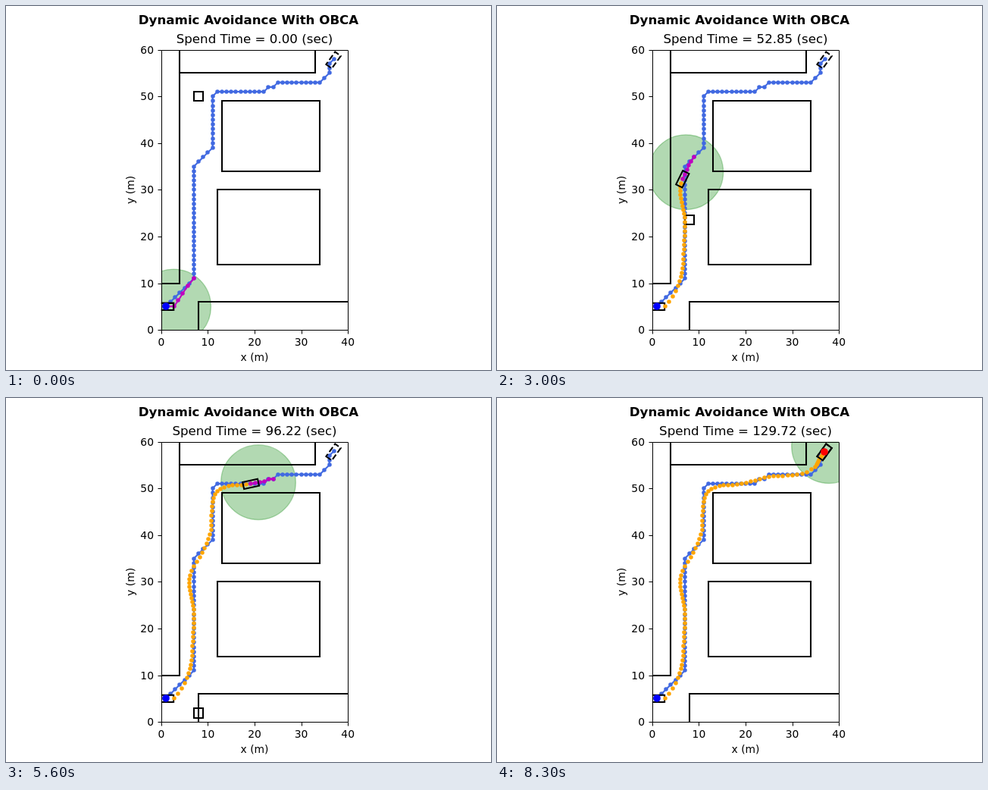
Animation, 640 px wide and 480 px high, one loop 8400 ms. Source, as an HTML page:

```html
<!DOCTYPE html>
<html lang="en">
<head>
<meta charset="utf-8">
<title>Dynamic Avoidance With OBCA</title>
<style>
  html, body { margin: 0; width: 100%; height: 100%; overflow: hidden; background: #fff; }
  svg { display: block; width: 640px; height: 480px; font: 13.89px "DejaVu Sans", sans-serif; }
  .title { font-size: 16.67px; }
  .bold { font-weight: bold; }
  .wall { fill: none; stroke: #000; stroke-width: 2.08; }
  .axis { fill: none; stroke: #000; stroke-width: 1; }
  .route { fill: none; stroke-width: 2.08; stroke-linejoin: round; }
  #range { fill: green; stroke: green; stroke-width: 1.39; fill-opacity: .3; stroke-opacity: .3; }
</style>
</head>
<body>
<svg viewBox="0 0 640 480">
  <defs><clipPath id="area"><rect x="204.8" y="57.6" width="246.4" height="369.6"/></clipPath></defs>
  <g text-anchor="middle">
    <text class="title bold" x="320" y="24">Dynamic Avoidance With OBCA</text>
    <text class="title" id="clock" x="328" y="49"></text>
    <text x="328" y="468">x (m)</text>
    <text transform="translate(169 242.4) rotate(-90)">y (m)</text>
  </g>
  <g clip-path="url(#area)">
    <circle id="range" r="49.28"/>
    <g id="map"></g>
    <path id="mover" class="wall"/>
    <g id="trail"></g>
    <g id="plan"></g>
    <path id="car" class="wall"/>
    <g id="ends"></g>
  </g>
  <g id="axes"></g>
</svg>
<script>
const STEP = 100, COUNT = 84, LAST = COUNT - 1, HORIZON = 5;
const CAR = { half: 1.65, side: 0.75 };
const px = x => 204.8 + 6.16 * x;
const py = y => 427.2 - 6.16 * y;
const $ = id => document.getElementById(id);
const mix = (a, b, k) => a + (b - a) * k;

// Everything is placed in metres; markers and walls sit on whole pixels
const line = points => "M" + points.map(([x, y]) => `${px(x)} ${py(y)}`).join("L");
const wall = points => "M" + points.map(([x, y]) => `${Math.round(px(x))} ${Math.round(py(y))}`).join("L");
const box = (x0, y0, x1, y1) => wall([[x0, y0], [x1, y0], [x1, y1], [x0, y1]]) + "Z";
const dot = ([x, y], color, r = 2.78) =>
  `<circle cx="${Math.round(px(x))}" cy="${Math.round(py(y))}" r="${r}" fill="${color}"/>`;
const dots = (points, color) => points.map(p => dot(p, color)).join("");

// Point at (forward, left) metres from a vehicle centre
const offset = ([x, y], angle, f, l) =>
  [x + f * Math.cos(angle) - l * Math.sin(angle), y + f * Math.sin(angle) + l * Math.cos(angle)];
function vehicle(pose, angle) {
  const { half, side } = CAR;
  const corners = [[-half, side], [-half, -side], [half, -side], [half, side]];
  return line(corners.map(([f, l]) => offset(pose, angle, f, l))) + "Z";
}

// Grid route: unit steps between its bends
const bends = [[1, 5], [7, 11], [7, 35], [11, 39], [11, 50], [12, 51], [22, 51], [23, 52],
  [24, 52], [25, 53], [34, 53], [36, 55], [36, 57], [37, 58]];
const route = [bends[0]];
for (const [bx, by] of bends.slice(1)) {
  let [x, y] = route[route.length - 1];
  while (x !== bx || y !== by) {
    x += Math.sign(bx - x);
    y += Math.sign(by - y);
    route.push([x, y]);
  }
}

// Driven path: a smooth curve through a few points (step, x, y)
const keys = [[0, 1, 5], [1, 2.75, 5], [5, 5.55, 9.45], [9, 6.55, 13.2], [12, 6.75, 16.2], [20, 7, 24],
  [26, 6.05, 28.95], [30, 6.5, 32.3], [34, 8.85, 36.3], [38, 10.5, 40.1], [40, 10.75, 42.1],
  [45, 11, 47.1], [48, 12, 49.35], [51, 14.4, 50.5], [56, 19.2, 50.95], [62, 25, 52.45],
  [69, 32.1, 53.05], [72, 34.95, 54.6], [76, 35.7, 56.05], [LAST, 36.9, 57.75]];
const segment = (table, t) => Math.max(1, table.findIndex(row => row[0] >= t));

function slope(n, axis) {
  const a = keys[Math.max(n - 1, 0)], b = keys[Math.min(n + 1, keys.length - 1)];
  return (b[axis] - a[axis]) / (b[0] - a[0]);
}
function poseAt(t) {
  const n = segment(keys, t), a = keys[n - 1], b = keys[n];
  const span = b[0] - a[0], k = (t - a[0]) / span;
  return [1, 2].map(axis =>
    mix(a[axis], b[axis], k * k * (3 - 2 * k)) +
    span * k * (1 - k) * (slope(n - 1, axis) * (1 - k) - slope(n, axis) * k));
}
const poses = Array.from({ length: COUNT }, (_, i) => poseAt(i));

function heading(i) {
  const n = Math.min(i, LAST - 1);
  return Math.atan2(poses[n + 1][1] - poses[n][1], poses[n + 1][0] - poses[n][0]);
}

// Elapsed seconds grow with the distance driven between known readings
const driven = [0];
for (let i = 1; i < COUNT; i++)
  driven[i] = driven[i - 1] + Math.hypot(poses[i][0] - poses[i - 1][0], poses[i][1] - poses[i - 1][1]);
const readings = [[0, 0], [12, 23.03], [30, 52.85], [40, 70.95], [56, 96.22], [69, 118.24], [LAST, 129.72]];
function seconds(i) {
  const n = segment(readings, i), [a, ta] = readings[n - 1], [b, tb] = readings[n];
  return mix(ta, tb, (driven[i] - driven[a]) / (driven[b] - driven[a]));
}

// Short look-ahead that bends from the driven path to the grid route
function lookAhead(i) {
  const target = Math.min(Math.round(Math.max(i + 2, 6 + 0.87 * i)), route.length - 1);
  return Array.from({ length: HORIZON + 1 }, (_, k) => {
    const own = poses[Math.min(i + k, LAST)], ref = route[target - HORIZON + k];
    const w = (k / HORIZON) ** 2;
    return [mix(own[0], ref[0], w), mix(own[1], ref[1], w)];
  });
}

function drawStatic() {
  const walls = wall([[0, 10], [4, 10], [4, 60]]) + wall([[4, 55], [33, 55], [33, 60]]) +
    wall([[8, 0], [8, 6], [40, 6]]) + box(13, 34, 34, 49) + box(12, 14, 34, 30);
  $("map").innerHTML =
    `<path class="route" stroke="royalblue" d="${line(route)}"/>${dots(route, "royalblue")}` +
    `<path class="wall" d="${walls}${vehicle(poses[0], 0)}"/>` +
    `<path class="wall" stroke-dasharray="7.7 3.33" d="${vehicle(poses[LAST], heading(LAST))}"/>`;

  let ticks = "", labels = "";
  for (let v = 0; v <= 60; v += 10) {
    const y = Math.round(py(v));
    ticks += `M205.5 ${y + 0.5}h-5`;
    labels += `<text x="195" y="${y + 5}" text-anchor="end">${v}</text>`;
    if (v > 40) continue;
    ticks += `M${Math.round(px(v)) + 0.5} 427.5v5`;
    labels += `<text x="${px(v)}" y="448" text-anchor="middle">${v}</text>`;
  }
  $("axes").innerHTML = `<path class="axis" d="M205.5 58.5H451.5V427.5H205.5Z${ticks}"/>${labels}`;
}

function draw(i) {
  const time = seconds(i), pose = poses[i], angle = heading(i), done = i === LAST;
  $("clock").textContent = `Spend Time = ${time.toFixed(2)} (sec)`;
  const [fx, fy] = offset(pose, angle, CAR.half, 0);
  $("range").setAttribute("cx", px(fx));
  $("range").setAttribute("cy", py(fy));
  const y = 50 - time / 2;
  $("mover").setAttribute("d", box(7, y - 1, 9, y + 1));
  $("trail").innerHTML = dots(poses.slice(1, i + 1), "orange");
  const ahead = lookAhead(i);
  $("plan").innerHTML = done ? "" :
    `<path class="route" stroke="#bf00bf" d="${line(ahead)}"/>${dots(ahead, "#bf00bf")}`;
  $("car").setAttribute("d", vehicle(pose, angle));
  $("ends").innerHTML = dot(poses[0], "blue", 4.86) + (done ? dot(pose, "red", 4.86) : "");
}

drawStatic();
draw(0);
const start = performance.now();
let shown = 0;
function tick() {
  const i = Math.floor((performance.now() - start) / STEP) % COUNT;
  if (i !== shown) draw(shown = i);
  requestAnimationFrame(tick);
}
requestAnimationFrame(tick);
</script>
</body>
</html>
```
